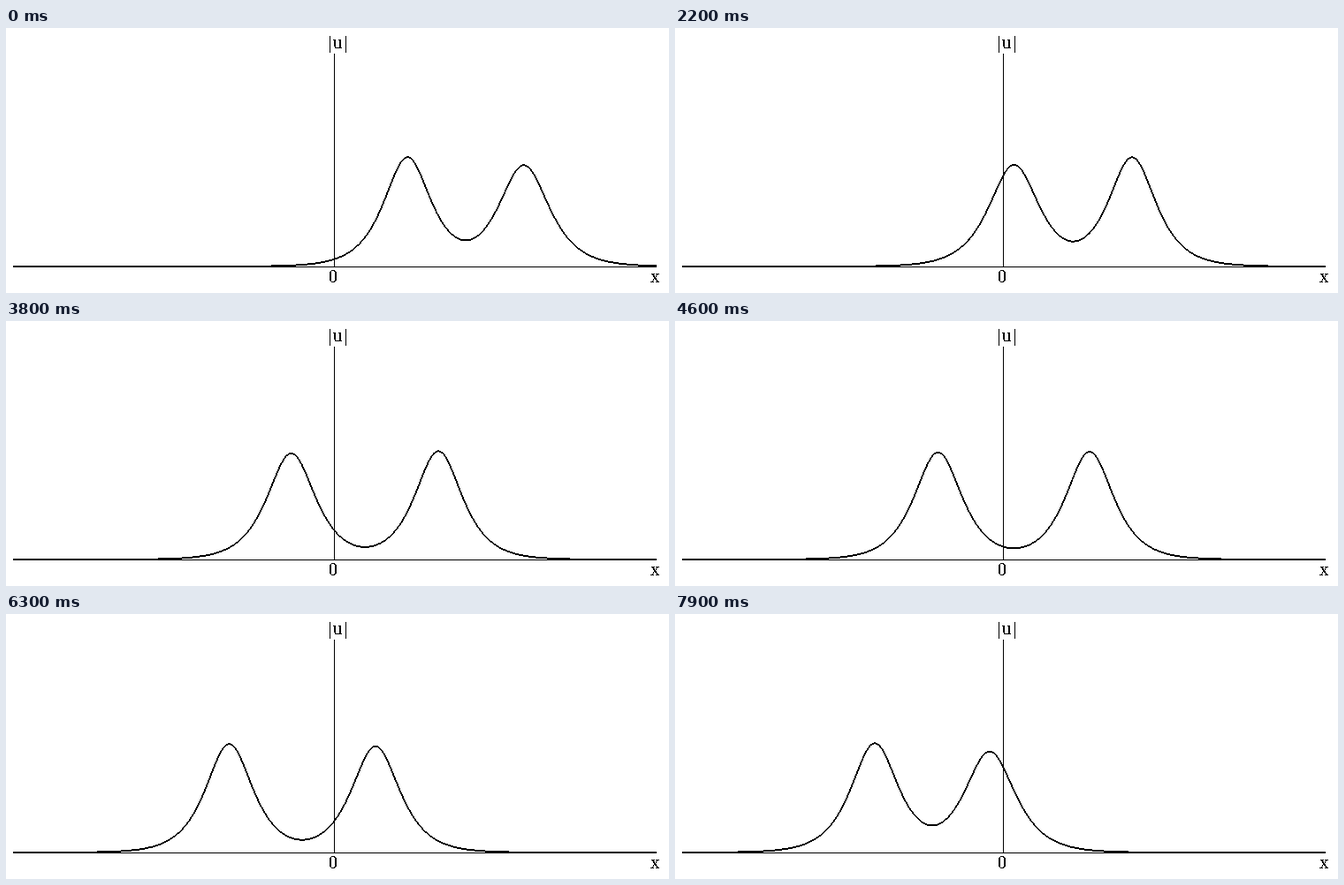
These frames come from a looping animation (750x300 px, 8000 ms). A matplotlib script:

```python
import numpy as np
import matplotlib.pyplot as plt
from matplotlib.animation import FuncAnimation
from matplotlib.patches import Polygon

W, H, DPI = 750, 300, 100
PX = 72 / DPI                       # points per pixel
FRAMES, STEP = 80, 100

# Bound pair of solitons, amplitudes in pixels
TOTAL, DIFF, SKEW = 245.0, 12.5, -5.0
DECAY = 0.0419                      # tail decay per pixel
START, SPEED = 517.0, -29.0         # centre of mass, px and px/s
PERIOD, MEET = 7.86, 1.076          # seconds
LEFT, RIGHT, BASE = 8, 736, 270


def two_soliton(x, phase):
    """Modulus of a two-soliton profile with mean amplitude 1."""
    unit = TOTAL / 2
    s, d, w = 2.0, DIFF / unit, SKEW / unit
    a, b = (s + d) / 2, (s - d) / 2
    psi = phase + w * x
    den = ((d * d + w * w) * np.cosh(s * x)
           + (s * s + w * w) * np.cosh(d * x)
           - 4 * a * b * np.cos(psi))
    first = b * (w * w - s * d) * np.cosh(a * x) - 2j * w * a * b * np.sinh(a * x)
    second = a * (w * w + s * d) * np.cosh(b * x) + 2j * w * a * b * np.sinh(b * x)
    turn = np.exp(0.5j * psi)
    return 2 * np.abs(first / turn + second * turn) / den


fig = plt.figure(figsize=(W / DPI, H / DPI), dpi=DPI, facecolor="white")
ax = fig.add_axes([0, 0, 1, 1])
ax.set(xlim=(0, W), ylim=(H, 0))
ax.axis("off")


def box(x, y, w, h):
    ax.add_patch(plt.Rectangle((x, y), w, h, fc="black", lw=0))


def label(x, y, text, size=21):
    ax.text(x, y, text, family="Liberation Serif", size=size * PX,
            ha="center", va="baseline", color="black", antialiased=False)


box(LEFT, BASE, RIGHT - LEFT, 1)
box(371, 29, 1, BASE - 29)
label(366.5, 23, "|")
label(375.5, 23, "u")
label(384.5, 23, "|")
label(370.5, 288.5, "0", 20)
label(734, 287.5, "x")

cols = np.arange(LEFT, RIGHT)
edges = np.repeat(np.arange(LEFT, RIGHT + 1), 2)[1:-1]
curve = ax.add_patch(Polygon([(LEFT, BASE), (RIGHT, BASE)], fc="black", lw=0))


def draw(i):
    t = i * STEP / 1000
    x = DECAY * (cols + 0.5 - START - SPEED * t)
    phase = 2 * np.pi * (t - MEET) / PERIOD
    y = BASE - TOTAL / 2 * two_soliton(x, phase)
    # two pixels thick: upright on gentle slopes, sideways on steep ones
    half = np.maximum(1, np.abs(np.gradient(y)))
    top = np.repeat(np.round(y - half), 2)
    bottom = np.repeat(np.round(y + half), 2)
    curve.set_xy(np.column_stack([np.r_[edges, edges[::-1]],
                                  np.r_[top, bottom[::-1]]]))
    return curve,


anim = FuncAnimation(fig, draw, frames=FRAMES, interval=STEP,
                     repeat=True, repeat_delay=0, blit=False)
plt.show()
```
